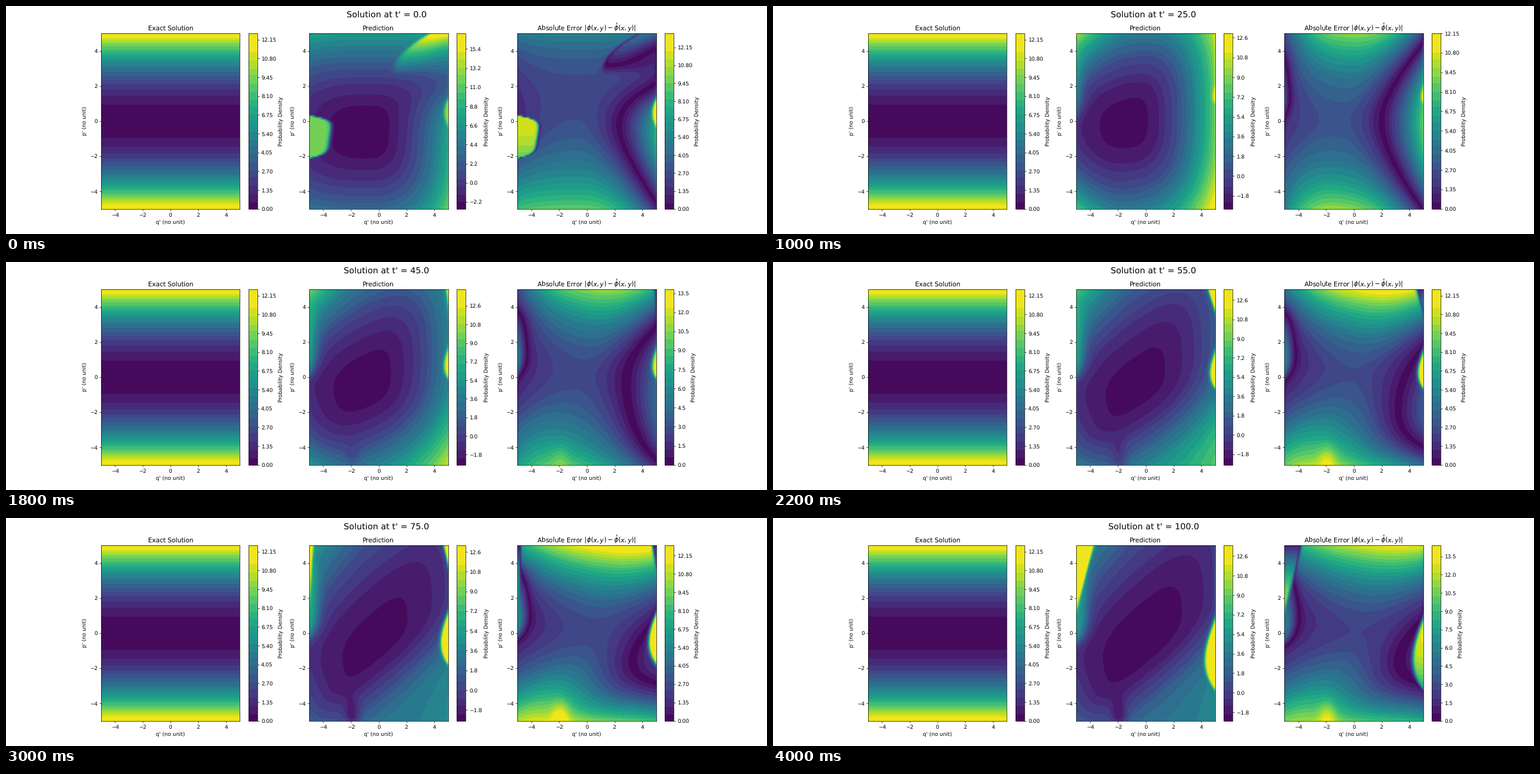
Recreate the animation shown at these times as a matplotlib script. Size 1280x384 px, loop 4.2 s.

```python
import numpy as np
import matplotlib.pyplot as plt
from matplotlib.animation import FuncAnimation

plt.rcParams["text.hinting"] = "no_hinting"

N_FRAMES, INTERVAL = 21, 200
BANDS = 21

axis = np.linspace(-5, 5, 100)
Q, P = np.meshgrid(axis, axis)
EXACT = P**2 / 2


def mix(a, b, w):
    return a + (b - a) * w


def ramp(i, start, end):
    return np.clip((i - start) / (end - start), 0, 1)


def sigmoid(x):
    return 1 / (1 + np.exp(-np.clip(x, -40, 40)))


def bulge(side, centre, half, depth, soft=.06, power=2, lean=0):
    """Mask of a lens that grows inward from the left (-1) or right (1) edge."""
    r = np.clip((P - centre) / half, -2, 2)
    reach = depth * (1 - abs(r) ** power) * (1 + lean * r)
    return sigmoid((reach - (5 - side * Q)) / soft)


def wedge(side, width, foot):
    """Mask of a triangle hanging from a top corner down to p = foot."""
    reach = width * (P - foot) / (5 - foot) - .12
    return sigmoid((reach - (5 - side * Q)) / .05)


def bowl(early, late):
    """Tilted valley with its own steepness on each of its four sides."""
    def var(first, middle, last):
        return mix(mix(middle, last, late), first, early)

    q0, p0 = var(-.8, -1.1, -.3), var(-.6, -.1, -.7)
    x = Q - q0
    y = P - p0 - var(0, .13, .63) * x
    right = var(.33, .3, .07) * (1 - .8 * early * sigmoid((P - 1.2) / .6))
    across = np.where(x > 0, right, var(.1, .1, .06)) * x**2
    cap = var(20, 20, 6)
    steep = np.where(y > 0, var(.35, .25, .1), var(.33, .25, .4))
    along = cap * np.tanh(steep * y**2 / cap)
    corners = var(0, 5.5, 2) * (np.minimum(x, 0) / 4) ** 2 * (P / 5) ** 2
    return var(-3, -2.9, -2.6) + (across**1.4 + along**1.4) ** (1 / 1.4) + corners


def lobe():
    """Bright tongue in the upper right with a sharp curved front."""
    rise = np.clip(P - 2.7, 0, None)
    front = Q - 1.05 - .52 * rise**2
    return ((1.5 + 3.6 * rise) * np.exp(-(front / 3.2) ** 2)
            * sigmoid(front / .08) * sigmoid((P - 2.75) / .12))


def prediction(i):
    early = 1 - ramp(i, 0, 2)
    late = ramp(i, 5, 14) ** 2 * (3 - 2 * ramp(i, 5, 14))
    drift = ramp(i, 5, 20)
    z = bowl(early, late) + early * lobe()
    z -= 2.7 * late * np.exp(-((Q + 1.9) / .6) ** 2 - ((P + 4.8) / .9) ** 2)

    def blend(value, mask, weight=1):
        return z + (value - z) * mask * weight

    # left edge: a slab that thins to a lens, then a soft skirt
    fade = 1 - ramp(i, 2, 5)
    slab = bulge(-1, .5 - 1.4 * early, 2.9 - 1.7 * early,
                 (.62 + .83 * early) * fade, power=2 + 4 * early, lean=.15 * early)
    z = blend(13 - 1.4 * early, slab, min(1, 3 * fade))
    skirt = bulge(-1, mix(2.4, 1.8, drift), mix(1.7, 2.3, drift),
                  mix(.2, .65, drift), soft=.25, power=4)
    z = blend(mix(8, 6.3, drift), skirt, ramp(i, 3, 6))
    z = blend(13.5, wedge(-1, .195 * max(i - 13, 0), 1))

    # right edge: a first spot, then a lens that slides down and grows
    z = blend(13.3, bulge(1, .5, .75, .25), early)
    lens = bulge(1, mix(1.5, -1.2, drift), mix(.4, 2, drift),
                 mix(.1, .7, drift), lean=-.35)
    z = blend(13, lens, ramp(i, 3, 5))
    return blend(13.8, wedge(1, .75 * np.exp(-((i - 12.5) / 3.2) ** 2), 3.5))


def pred_span(i):
    lo = np.interp(i, [0, 2, 5, 20], [-3, -3.2, -3, -2.6])
    hi = np.interp(i, [0, 2, 5, 9, 13, 20], [17.2, 16.6, 13, 14.2, 13.2, 13.5])
    return lo, hi


def error_top(i):
    return np.interp(i, [0, 2, 3, 4, 5, 7, 9, 10, 14, 16, 17, 20],
                     [13.2, 13.05, 13.8, 13.65, 12.15, 13.65, 13.8,
                      12.6, 12.6, 13.2, 13.8, 14.4])


def fine_levels(lo, hi, step):
    return np.round(np.arange(round(lo / step), round(hi / step) + 1) * step, 6)


def panel(fig, ax, z, levels, title):
    # neighbouring fine levels share one colour
    x = np.linspace(0, 1, len(levels) - 1)
    k = np.minimum(np.floor((x + .012) * 22), BANDS - 1)
    starts = np.flatnonzero(np.diff(k, prepend=-1))
    edges = np.append(levels[starts], levels[-1])
    colors = plt.cm.viridis((k[starts] + .5) / BANDS)
    z = np.clip(z, levels[0] + 1e-6, levels[-1] - 1e-6)
    filled = ax.contourf(Q, P, z, levels=edges, colors=colors)

    stride = int(np.ceil(len(levels) / 10))
    first = np.argmin(abs(levels)) % stride
    fig.colorbar(filled, ax=ax, spacing="proportional",
                 ticks=levels[first::stride], label="Probability Density")
    ax.set(title=title, xlabel="q' (no unit)", ylabel="p' (no unit)")


fig = plt.figure(figsize=(20, 6), dpi=64)


def draw(i):
    fig.clear()
    axes = fig.subplots(1, 3)
    z = prediction(i)
    panel(fig, axes[0], EXACT, fine_levels(0, 12.6, .15), "Exact Solution")
    panel(fig, axes[1], z, fine_levels(*pred_span(i), .2), "Prediction")
    panel(fig, axes[2], abs(EXACT - z), fine_levels(0, error_top(i), .15),
          r"Absolute Error $|\phi(x,y)-\hat{\phi}(x,y)|$")
    fig.suptitle(f"Solution at t' = {5 * i:.1f}", fontsize=16)


anim = FuncAnimation(fig, draw, frames=N_FRAMES, interval=INTERVAL,
                     repeat=True, repeat_delay=0)
plt.show()
```
